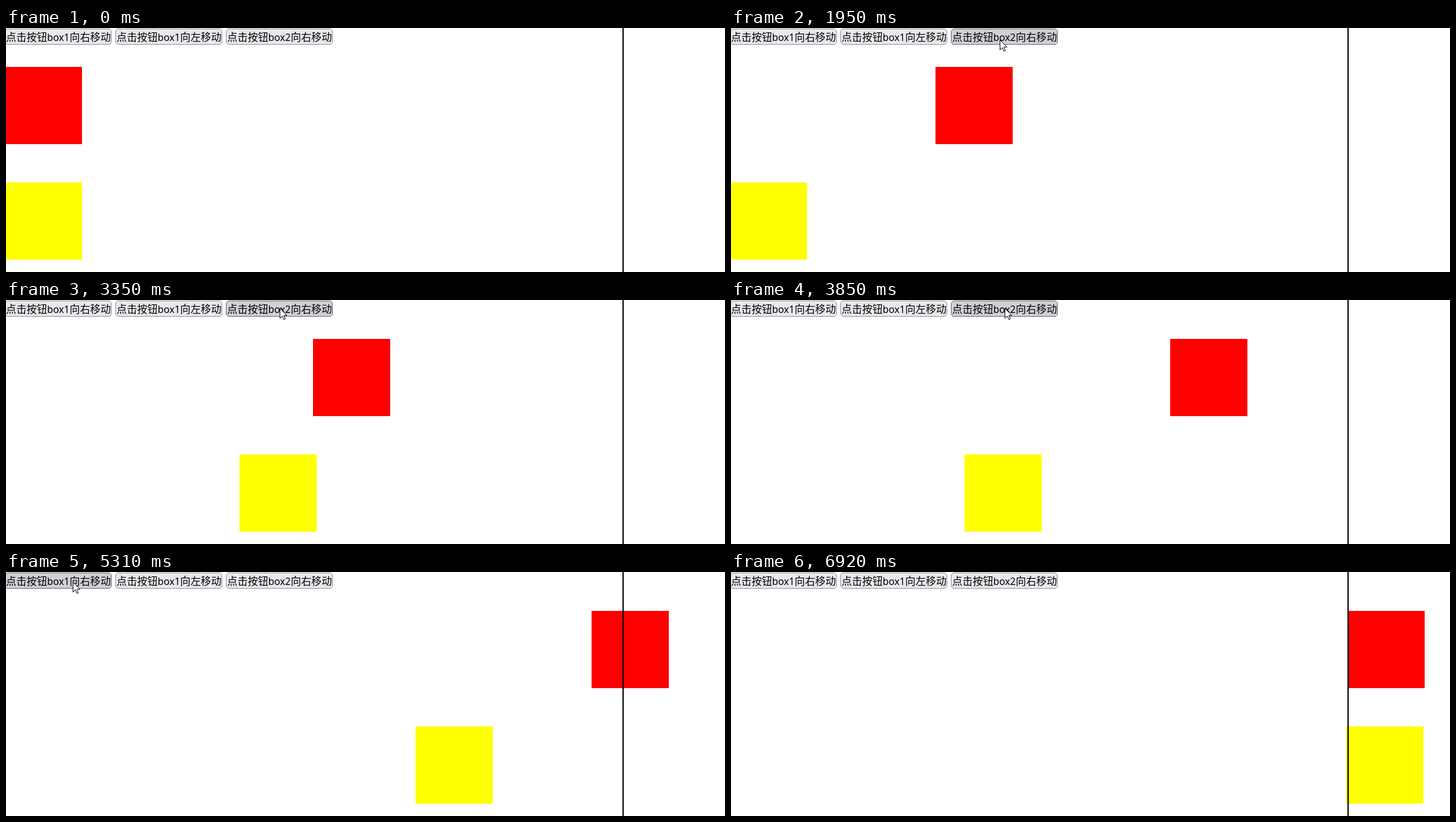
Recreate the animation shown at these times as an HTML page with a canvas. Size 1164 by 395 pixels, loop 8000 ms.

```html
<!DOCTYPE html>
<html lang="zh">
<head>
<meta charset="utf-8">
<style>
html, body { margin: 0; width: 100%; height: 100%; overflow: hidden; background: #fff; }
canvas { display: block; }
</style>
</head>
<body>
<canvas id="stage" width="1164" height="395"></canvas>
<script>
const ctx = document.getElementById('stage').getContext('2d');
const LOOP = 8000, TICK = 69.9, LAST = 99;
const STEP = 23.75, WALL = 998;
const labels = [['box1', '向右移动'], ['box1', '向左移动'], ['box2', '向右移动']];
const buttonX = i => -2 + 179 * i;

// Each click starts one box stepping and stops the other one.
const clicks = [
  { at: 16, button: 0, steps: 14, rate: 1.25 },
  { at: 28, button: 2, steps: 16, rate: 1.25 },
  { at: 41.4, button: 0, steps: 26, rate: 1.18 },
  { at: 65.7, button: 2, steps: 26, rate: 1.25 },
  { at: 88, button: 0, steps: 3, rate: 1.25 }
];

const entry = { x: 584, y: 375 };
const moves = [
  { from: 1, to: 11, x: 120, y: 17 },
  { from: 18, to: 25, x: 435, y: 19 },
  { from: 36, to: 40, x: 134, y: 19 },
  { from: 43, to: 48, x: 443, y: 13 },
  { from: 66, to: 76, x: 108, y: 16 },
  { from: 89, to: 96, x: 440, y: 17 },
  { from: 96, to: 98, x: 593, y: 357 }
];

// The pointer slows down towards each stop and sags a little on the way.
function pointerAt(tick) {
  let { x, y } = entry;
  for (const m of moves) {
    const p = Math.min(1, Math.max(0, (tick - m.from) / (m.to - m.from)));
    const e = 1 - (1 - p) ** 2;
    x += (m.x - x) * e;
    y += (m.y - y) * e + 18 * Math.sin(Math.PI * e);
  }
  return { x, y };
}

function drawBox(color, button, y, tick) {
  let steps = 0;
  for (const c of clicks) {
    if (c.button === button && tick > c.at) {
      steps += Math.min(c.steps, Math.floor((tick - c.at) * c.rate));
    }
  }
  ctx.fillStyle = color;
  ctx.fillRect(Math.min(WALL, Math.floor(-1.5 + STEP * steps)), y, 125, 125);
}

function drawButton([name, action], x, hover, active) {
  ctx.beginPath();
  ctx.roundRect(x + 0.5, 1.5, 172, 25, 4.5);
  ctx.fillStyle = active ? '#b1b1b9' : hover ? '#d0d0d7' : '#e9e9ed';
  ctx.fill();
  ctx.strokeStyle = active ? '#484851' : hover ? '#676774' : '#8f8f9d';
  ctx.stroke();

  ctx.fillStyle = '#000';
  ctx.font = '16.67px "Noto Sans CJK SC", "Noto Sans CJK", sans-serif';
  ctx.fillText('点击按钮', x + 2, 21);
  ctx.fillText(action, x + 105, 21);
  ctx.font = '15.8px "Noto Sans", "Open Sans", sans-serif';
  ctx.fillText(name, x + 68.5, 21);
}

const arrow = new Path2D('M.5 .5V16.5L4.2 13 6.8 18.6 9.2 17.6 6.7 12H11.7Z');

function drawPointer({ x, y }) {
  ctx.save();
  ctx.translate(Math.round(x), Math.round(y));
  ctx.fillStyle = '#fff';
  ctx.strokeStyle = '#000';
  ctx.fill(arrow);
  ctx.stroke(arrow);
  ctx.restore();
}

function draw(now) {
  const tick = Math.min(LAST, Math.floor(now % LOOP / TICK + 0.15));
  const shown = tick > 0 && tick < LAST;
  // Hover trails the pointer by one tick.
  const seen = pointerAt(tick - 1);

  ctx.fillStyle = '#fff';
  ctx.fillRect(0, 0, 1164, 395);
  labels.forEach((label, i) => {
    const x = buttonX(i);
    const hover = shown && seen.y < 27 && seen.x >= x && seen.x < x + 173;
    const active = clicks.some(c => c.button === i && Math.ceil(c.at) - 1 === tick);
    drawButton(label, x, hover, active);
  });
  drawBox('#f00', 0, 63, tick);
  drawBox('#ff0', 2, 250, tick);
  ctx.fillStyle = '#000';
  ctx.fillRect(WALL, 0, 2, 395);
  if (shown) drawPointer(pointerAt(tick));
}

const start = performance.now();
function loop() {
  draw(performance.now() - start);
  requestAnimationFrame(loop);
}
loop();
</script>
</body>
</html>
```
